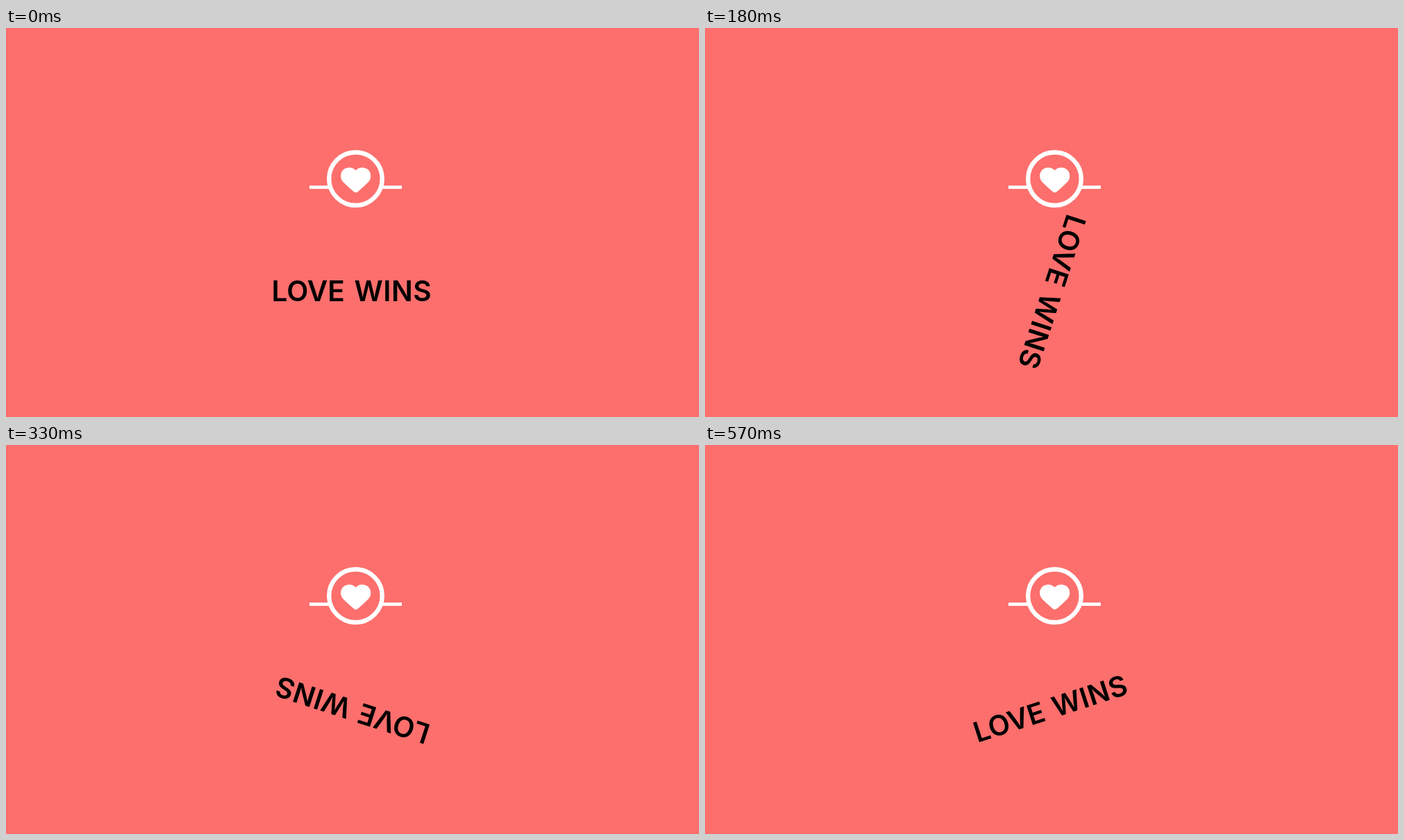
An HTML page for the animation above (600 ms loop, 998 px wide and 561 px high).

```html
<!DOCTYPE html>
<html lang="en">
<head>
<meta charset="utf-8">
<title>Love wins</title>
<style>
  html, body { margin: 0; width: 100%; height: 100%; overflow: hidden; background: #fc6f6d; }
  svg { display: block; width: 998px; height: 561px; }
  text { font: 600 40.5px Inter, "Liberation Sans", sans-serif; word-spacing: 3.5px; }
  tspan { letter-spacing: 0.5px; }
</style>
</head>
<body>
<svg viewBox="0 0 998 561">
  <rect width="998" height="561" fill="#fc6f6d"/>
  <g fill="none" stroke="#fff">
    <path d="M437 229.7H466M541 229.7H570" stroke-width="4.8"/>
    <circle cx="503.5" cy="217.5" r="38.3" stroke-width="6.4"/>
  </g>
  <path fill="#fff" d="M503.7 205.3C499 200.3 491.5 199.8 486.5 203.8C481 208.3 480.6 216.8 485.7 222.3
    C489.8 226.7 495.5 231.5 500.7 236Q503.7 238.5 506.7 236C511.9 231.5 517.6 226.7 521.7 222.3
    C526.8 216.8 526.4 208.3 520.9 203.8C515.9 199.8 508.4 200.3 503.7 205.3Z"/>
  <g id="spinner"><text x="-116" y="13.4">LOVE <tspan>WINS</tspan></text></g>
</svg>
<script>
  const LOOP = 600, STEP = 30, CENTER = "498.5 381";
  const spinner = document.getElementById("spinner");

  // One full turn per loop, in discrete steps of 18 degrees.
  function draw(ms) {
    const step = Math.floor((ms % LOOP) / STEP);
    const angle = step * STEP / LOOP * 360;
    spinner.setAttribute("transform", `translate(${CENTER}) rotate(${angle})`);
  }

  let start;
  function tick(now) {
    start ??= now;
    draw(now - start);
    requestAnimationFrame(tick);
  }

  draw(0);
  requestAnimationFrame(tick);
</script>
</body>
</html>
```
